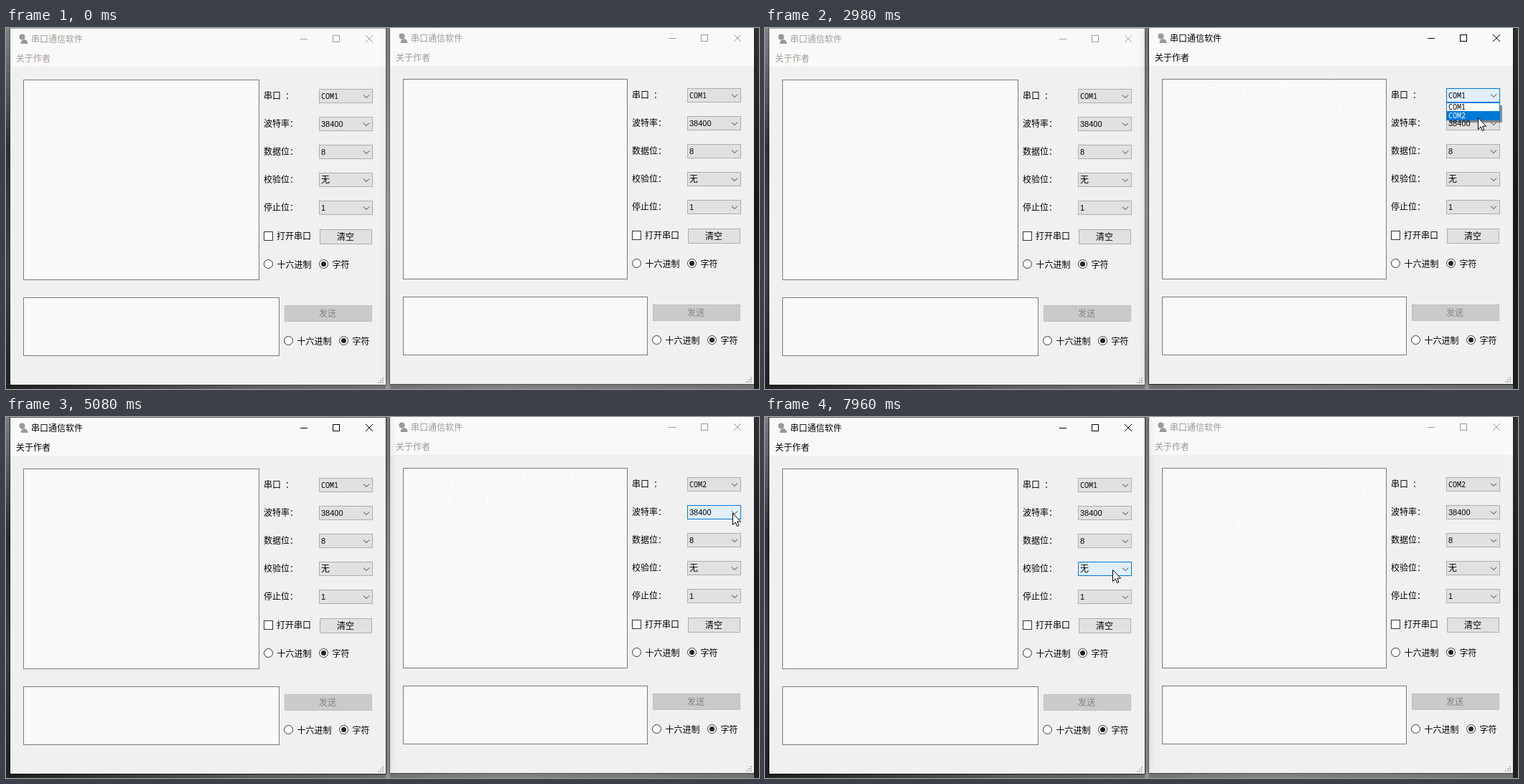
An HTML page with a canvas that plays this animation: 1049 by 504 pixels, repeating every 7.99 s.

```html
<!DOCTYPE html>
<html lang="zh-CN">
<head>
<meta charset="utf-8">
<style>
html, body { margin: 0; width: 100%; height: 100%; overflow: hidden; background: #222; }
canvas { display: block; }
</style>
</head>
<body>
<canvas id="stage" width="1049" height="504"></canvas>
<script>
const c = document.getElementById('stage').getContext('2d');
const LOOP = 7990, STEP = 30, APPEAR = 100, BLUE = '#0078d7';
const CJK = '12px "Noto Sans CJK SC", "Noto Sans CJK", sans-serif';
const DIGITS = '11px "Liberation Sans", sans-serif';
const PORT = '500 10px "Noto Sans Mono", monospace';

const rows = [
  { label: '串口\u2002：', items: ['COM1', 'COM2'], preset: 0 },
  { label: '波特率：', items: ['9600', '19200', '38400', '57600', '115200'], preset: 2 },
  { label: '数据位：', items: ['8', '7', '6', '5'], preset: 0 },
  { label: '校验位：', items: ['无', '奇', '偶'], preset: 0 },
  { label: '停止位：', items: ['1'], preset: 0 }
];

// Each visit moves the pointer to a combo box and may open its list.
// bend shapes the path; trail is the spacing in ms of the marks left behind.
const visits = [
  { go: 370, stop: 730, x: 492, row: 0, bend: .5, trail: 25, open: 940, shut: 1540, pick: 0 },
  { go: 1690, stop: 2350, x: 993, row: 0, bend: 3, trail: 30, open: 2560, shut: 3130, pick: 1 },
  { go: 3280, stop: 3760, x: 461, row: 1, bend: 1, open: 4240, shut: 4420, pick: 2 },
  { go: 4630, stop: 5080, x: 1012, row: 1, bend: .3, trail: 77 },
  { go: 5590, stop: 6400, x: 500, row: 2, bend: 2, trail: 130, open: 6820, shut: 7090, pick: 0 },
  { go: 7090, stop: 7270, x: 488, row: 3, bend: 1, open: 7450, shut: 7690, pick: 0 },
  { go: 7690, stop: 7930, x: 484, row: 3, bend: 1 }
];
for (const v of visits) v.win = v.x > 530 ? 1 : 0;

const rowTop = row => 85 + 39 * row;
const mix = (a, b, p) => a + (b - a) * p;
const ease = (t, from, to) => 1 - (1 - Math.min(1, Math.max(0, (t - from) / (to - from)))) ** 3;
const overText = ([x, y]) => x > 553 && x < 866 && y > 71 && y < 351;
const isOpen = (v, t) => t >= v.open && t < v.shut;

function pointer(t) {
  let x = 954, y = 56;
  for (const v of visits) {
    if (t < v.go) break;
    const p = ease(t, v.go, v.stop), top = rowTop(v.row) - v.win;
    x = mix(x, v.x, p);
    y = mix(y, top + 11, p ** v.bend);
    if (t >= v.open) y = mix(y, top + 29 + 12 * v.pick, ease(t, v.open, mix(v.open, v.shut, .6)));
  }
  return [Math.round(x), Math.round(y)];
}

const marks = [];
for (const v of visits.filter(v => v.trail))
  for (let t = v.go; t < v.stop; t += v.trail) {
    const at = pointer(t);
    if (overText(at) && at[0] > 590 && at[0] < 850) marks.push({ t, at });
  }

function text(s, x, y, color = '#000', font = CJK) {
  c.font = font;
  c.fillStyle = color;
  c.fillText(s, x, y);
}

function value(s, y, color) {
  text(s, 439, y, color, s > '~' ? CJK : s > 'A' ? PORT : DIGITS);
}

function box(x, y, w, h, fill, edge) {
  c.fillStyle = fill;
  c.fillRect(x, y, w, h);
  c.strokeStyle = edge;
  c.strokeRect(x + .5, y + .5, w - 1, h - 1);
}

function line(color, ...pts) {
  c.strokeStyle = color;
  c.beginPath();
  for (let i = 0; i < pts.length; i += 2) c.lineTo(pts[i], pts[i + 1]);
  c.stroke();
}

function disc(x, y, r, fill) {
  c.fillStyle = fill;
  c.beginPath();
  c.arc(x, y, r, 0, 7);
  c.fill();
}

function radio(x, y, label, on) {
  disc(x, y, 6, '#fff');
  c.strokeStyle = '#333';
  c.stroke();
  if (on) disc(x, y, 3.5, '#222');
  text(label, x + 12, y + 5);
}

function radios(x, y) {
  radio(x, y, '十六进制');
  radio(x + 77, y, '字符', true);
}

function gradient(x, y, w, h, ...colors) {
  const g = w > h ? c.createLinearGradient(x, 0, x + w, 0) : c.createLinearGradient(0, y, 0, y + h);
  colors.forEach((k, i) => g.addColorStop(i / (colors.length - 1), k));
  c.fillStyle = g;
  c.fillRect(x, y, w, h);
}

function backdrop() {
  gradient(0, 497, 1049, 7, '#222', '#666', '#888', '#777');
  gradient(0, 0, 6, 504, '#888', '#333', '#444', '#222');
  gradient(529, 0, 6, 504, '#888', '#aaa', '#999');
  gradient(1042, 0, 7, 504, '#333', '#181818', '#222');
}

function ibeam([x, y], color) {
  for (const dy of [-7.5, 7.5]) line(color, x - 3.5, y + dy, x + 4.5, y + dy);
  line(color, x + .5, y - 7.5, x + .5, y + 7.5);
}

const arrowShape = new Path2D('M0 0V16L3.7 12.5 6 18 8.4 17 6.2 11.7 11 11.5Z');
function arrow([x, y]) {
  c.save();
  c.translate(x + .5, y + .5);
  c.fillStyle = '#fff';
  c.fill(arrowShape);
  c.strokeStyle = '#000';
  c.stroke(arrowShape);
  c.restore();
}

function combo(t, win, row) {
  const y = rowTop(row), { items, preset } = rows[row];
  const mine = visits.filter(v => v.win === win && v.row === row);
  const last = visits.findLast(v => t >= v.stop);
  const on = mine.includes(last) && !(t >= last.shut);
  const chosen = mine.findLast(v => t >= v.shut);
  box(436, y, 75, 20, on ? '#e1effa' : '#e1e1e1', on ? BLUE : '#adadad');
  value(items[chosen ? chosen.pick : preset], y + 14);
  line('#333', 498, y + 8.5, 502, y + 12.5, 506, y + 8.5);
}

function dropdown({ win, row }, at) {
  const y = rowTop(row) + 20, { items, preset } = rows[row];
  const over = Math.floor((at[1] + win - y) / 12);
  const lit = items[over] ? over : preset;
  c.fillStyle = 'rgba(0,0,0,.4)';
  c.fillRect(440, y + 4, 74, items.length * 12);
  box(436, y, 75, items.length * 12 + 1, '#fff', BLUE);
  items.forEach((s, i) => {
    if (i === lit) {
      c.fillStyle = BLUE;
      c.fillRect(437, y + 12 * i, 73, 12);
    }
    value(s, y + 12 * i + 10, i === lit ? '#fff' : '#000');
  });
}

function shifted(dx, dy, draw) {
  c.save();
  c.translate(dx, dy);
  draw();
  c.restore();
}
const atColumn = (win, draw) => shifted(513 * win, -win, draw);

function leftPart(win, active, ink) {
  const cut = 16 * win;
  c.save();
  c.shadowColor = `rgba(0,0,0,${active ? .35 : .2})`;
  c.shadowBlur = active ? 14 : 10;
  c.fillStyle = '#f0f0f0';
  c.fillRect(6, 0, 523 - cut, 498);
  c.restore();
  c.strokeStyle = `rgba(0,0,0,${active ? .65 : .3})`;
  c.strokeRect(5.5, .5, 524 - cut, 498);
  c.fillStyle = '#f9f9f9';
  c.fillRect(6, 1, 523 - cut, 53);

  // Plain bust icon
  disc(22.5, 12.5, 4, '#999');
  c.beginPath();
  c.ellipse(25.5, 22, 5, 6, 0, Math.PI, 0);
  c.fill();
  text('串口通信软件', 35, 20, ink);
  text('关于作者', 14, 47, ink);
  box(24, 72, 329 - cut, 280, '#f9f9f9', '#7a7a7a');
  box(24, 376, 357 - cut, 82, '#f9f9f9', '#7a7a7a');
}

function rightPart(t, win, ink) {
  line(ink, 410, 15.5, 420, 15.5);
  c.strokeRect(455.5, 10.5, 9, 9);
  line(ink, 501, 10, 511, 20);
  line(ink, 511, 10, 501, 20);
  rows.forEach(({ label }, row) => {
    text(label, 359, rowTop(row) + 14);
    combo(t, win, row);
  });
  box(359, 284, 13, 13, '#fff', '#333');
  text('打开串口', 377, 295);
  box(437, 281, 73, 21, '#e1e1e1', '#adadad');
  text('清空', 461, 296);
  radios(365.5, 329.5);
  box(388, 387, 122, 23, '#cacaca', '#bfbfbf');
  text('发送', 436, 403, '#838383');
  radios(393.5, 436.5);
  c.fillStyle = '#b8b8b8';
  for (let i = 0; i < 3; i++)
    for (let j = 0; j <= i; j++) c.fillRect(524 - 3 * j, 488 + 3 * i, 2, 2);
}

function drawWindow(t, win, active) {
  const ink = active ? '#000' : win ? '#999' : '#a59b94';
  shifted(529 * win, -win, () => leftPart(win, active, ink));
  atColumn(win, () => rightPart(t, win, ink));
  if (win) for (const m of marks) if (t > m.t) ibeam(m.at, '#fff');
}

function draw(t) {
  backdrop();
  const clicked = visits.findLast(v => t >= v.stop + STEP);
  const active = clicked ? clicked.win : -1;
  for (const win of active === 0 ? [1, 0] : [0, 1]) drawWindow(t, win, win === active);
  if (t < APPEAR) return;
  const at = pointer(t), opened = visits.find(v => isOpen(v, t));
  if (opened) atColumn(opened.win, () => dropdown(opened, at));
  if (overText(at)) ibeam(at, '#000');
  else arrow(at);
}

const start = performance.now();
function tick() {
  const t = (performance.now() - start) % LOOP;
  draw(Math.max(0, Math.floor((t - 10) / STEP) * STEP + 10));
  requestAnimationFrame(tick);
}
tick();
</script>
</body>
</html>
```
